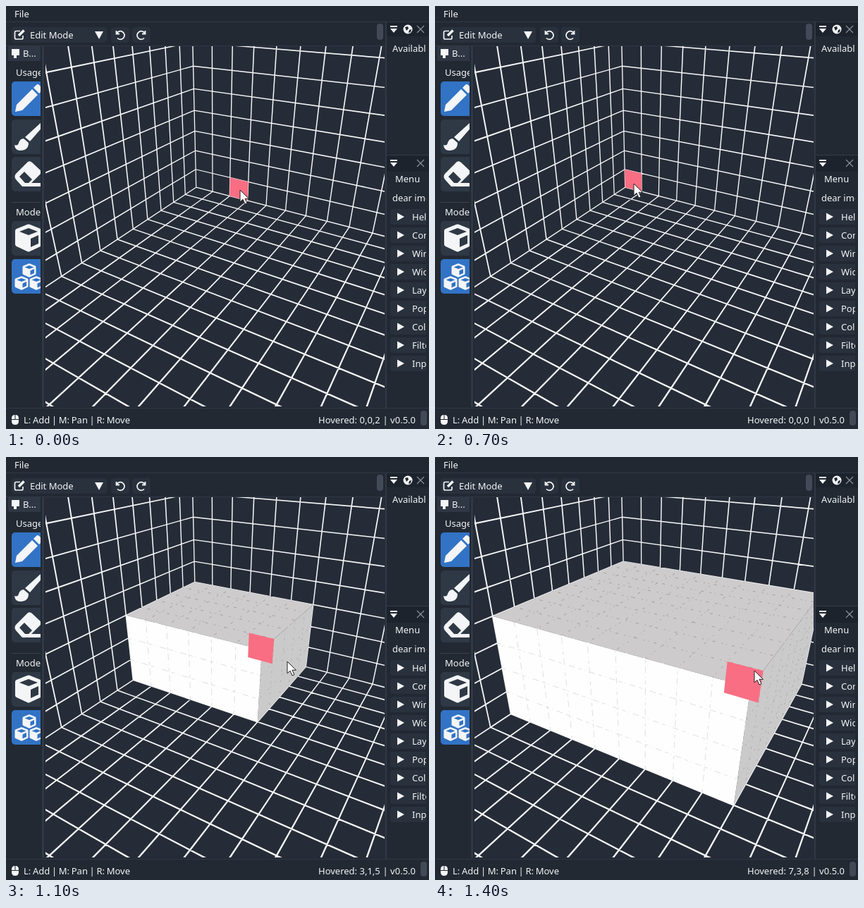
An HTML page for the animation above (1500 ms loop, 600 by 600 pixels).

```html
<!DOCTYPE html>
<html lang="en">
<head>
<meta charset="utf-8">
<title>Voxel editor</title>
<style>
html, body { margin: 0; width: 100%; height: 100%; overflow: hidden; background: #222933; }
svg { display: block; width: 100%; height: 100%; }
text { font: 500 13px "Noto Sans", "Open Sans", sans-serif; fill: #f3f5f7; white-space: pre; }
</style>
</head>
<body>
<svg viewBox="0 0 600 600">
  <defs>
    <clipPath id="view"><rect x="56" y="57" width="481" height="511"/></clipPath>
    <clipPath id="left"><rect y="56" width="49" height="514"/></clipPath>
    <clipPath id="right"><rect x="540" y="22" width="56" height="548"/></clipPath>
    <g id="fold" fill="#f3f5f7"><path d="M-5-5H5V-3H-5ZM-5-1H5L0 5Z"/></g>
    <path id="close" d="M-5-5L5 5M5-5L-5 5" stroke="#8d949e" stroke-width="1.1"/>
    <path id="cube" fill="#f3f5f7" fill-rule="evenodd" d="M-2-19Q0-20 2-19L17-13Q19-12 19-10V9Q19 11 17 12L2 19Q0 20-2 19L-17 12Q-19 11-19 9V-10Q-19-12-17-13ZM0-14L-13-9 0-4 13-9ZM3 1V13L14 8V-4Z"/>
    <path id="turn" d="M-5.5-6V-1.5H-1M-5-2A5.8 5.8 0 1 1-4 4.5" fill="none" stroke="#f3f5f7" stroke-width="1.8"/>
  </defs>

  <!-- bars -->
  <rect width="600" height="600" fill="#222933"/>
  <rect width="600" height="22" fill="#222832"/>
  <path d="M0 22.5H600M0 570.5H600M0 56.5H538" stroke="#303844"/>
  <text x="12" y="16">File</text>
  <rect x="8" y="30" width="135" height="22" rx="4" fill="#29313c"/>
  <g fill="none" stroke="#f3f5f7" stroke-width="1.7">
    <path d="M20 35.5H14.5Q12.500 35.500 12.500 37.500V45Q12.500 47 14.500 47H22Q24 47 24 45V42"/>
    <path d="M18 42L25.500 34.500" stroke-width="3.600"/>
  </g>
  <text x="34" y="46">Edit Mode</text>
  <path d="M126 36H138L132 47Z" fill="#f3f5f7"/>
  <rect x="149" y="30" width="26" height="22" rx="4" fill="#29313c"/>
  <rect x="179" y="30" width="26" height="22" rx="4" fill="#29313c"/>
  <use href="#turn" x="162" y="41"/>
  <use href="#turn" transform="translate(192 41) scale(-1 1)"/>
  <rect x="526" y="25" width="9" height="23" rx="4" fill="#424a57"/>

  <!-- tools -->
  <rect x="3" y="57" width="46" height="21" fill="#2e3743"/>
  <path d="M8 61H19V70H8ZM11 70H15V74H11Z" fill="#f3f5f7"/>
  <text x="24" y="72">B...</text>
  <g clip-path="url(#left)">
    <text x="14" y="99">Usage</text>
    <text x="14" y="297">Model</text>
    <path d="M8 278.500H49" stroke="#3a424e"/>
    <g id="buttons"></g>
    <path d="M13 150L15 140 37 118 45 126 23 148ZM39 116L43 112Q45 110 47 112L51 116Q53 118 51 120L47 124Z" fill="#f3f5f7"/>
    <path d="M49 166L53 170 34 192 27 186ZM25 188L32 194Q32 205 20 205 13 205 12 197 17 199 18 194 20 188 25 188Z" fill="#f3f5f7"/>
    <path d="M14 238L31 221Q34 219 37 222L51 235V236L36 251H52V256H23L14 246Q11 242 14 238ZM19 242L27 251H32L37 246 26 235Z" fill="#f3f5f7" fill-rule="evenodd"/>
    <use href="#cube" x="32" y="329"/>
    <use href="#cube" transform="translate(33 375) scale(.5)"/>
    <use href="#cube" transform="translate(22 393) scale(.5)"/>
    <use href="#cube" transform="translate(43 393) scale(.5)"/>
  </g>
  <path d="M52.500 57V569" stroke="#303946" stroke-width="3"/>

  <!-- viewport -->
  <rect x="55" y="57" width="483" height="512" fill="#262c37"/>
  <g clip-path="url(#view)">
    <path id="grid" fill="#f6f7f8"/>
    <g id="scene"></g>
    <path id="hover" fill="#f96e82"/>
  </g>

  <!-- side panels -->
  <path d="M539 22V570" stroke="#303844" stroke-width="2"/>
  <rect x="540" y="23" width="60" height="20" fill="#1d232d"/>
  <rect x="540" y="212" width="60" height="23" fill="#1d232d"/>
  <path d="M540 211.500H600" stroke="#343c48"/>
  <use href="#fold" x="550" y="33"/>
  <use href="#fold" x="550" y="223"/>
  <circle cx="570" cy="33" r="6.500" fill="#f3f5f7"/>
  <path d="M566 30L570 29 571 32 568 35ZM572 34L575 33 574 37 571 38Z" fill="#1d232d"/>
  <use href="#close" x="588" y="33"/>
  <use href="#close" x="588" y="223"/>
  <g clip-path="url(#right)">
    <text x="548" y="65">Available</text>
    <text x="552" y="250">Menu</text>
    <text x="548" y="277">dear imgui</text>
    <g id="tree"></g>
  </g>

  <!-- status -->
  <path d="M8 586V585Q8 580 12.500 580V586ZM13.500 580Q18 580 18 585V586H13.500ZM8 587H18V589Q18 594 13 594 8 594 8 589Z" fill="#f3f5f7"/>
  <text x="25" y="592" word-spacing="-.7">L: Add | M: Pan | R: Move</text>
  <text id="status" x="443" y="592"></text>
  <text x="581" y="592" text-anchor="end">| v0.5.0</text>
  <rect x="588" y="574" width="9" height="21" rx="4" fill="#424a57"/>

  <path id="cursor" d="M0 0V17L4 13.300 7 20 10 18.700 7 12.300H12.500Z" fill="#fff" stroke="#222" stroke-width="1"/>
</svg>
<script>
const el = id => document.getElementById(id);

// Camera: 45 degree lens centred in the viewport, no roll
const rad = Math.PI / 180;
const center = [296.7, 312.5];
const focal = 255.5 / Math.tan(22.5 * rad);
const pitch = 30 * rad, yaw = 31 * rad;
const dist = 22.6;
const origin = [269.7, 257.2]; // where the grid corner lands on screen
const [sp, cp, sy, cy] = [Math.sin(pitch), Math.cos(pitch), Math.sin(yaw), Math.cos(yaw)];

function project([x, y, z]) {
  const along = x * cy + z * sy;
  const depth = dist - cp * along - sp * y;
  const right = z * cy - x * sy + (origin[0] - center[0]) / focal * dist;
  const down = sp * along - cp * y + (origin[1] - center[1]) / focal * dist;
  return [center[0] + focal * right / depth, center[1] + focal * down / depth, depth / dist];
}
const pt = p => project(p).slice(0, 2).map(n => n.toFixed(2)).join(" ");
const poly = ps => "M" + ps.map(pt).join("L") + "Z";

// A line that gets thicker toward the viewer
function beam(a, b) {
  const [ax, ay, aw] = project(a), [bx, by, bw] = project(b);
  const len = Math.hypot(bx - ax, by - ay);
  const nx = (ay - by) / len, ny = (bx - ax) / len;
  const h = 0.6;
  const at = (x, y, r) => (x + nx * r).toFixed(2) + " " + (y + ny * r).toFixed(2);
  return "M" + [at(ax, ay, h / aw), at(bx, by, h / bw), at(bx, by, -h / bw), at(ax, ay, -h / aw)].join("L") + "Z";
}

function drawGrid() {
  const N = 14, H = 8;
  let d = "";
  for (let i = 0; i <= N; i++) {
    d += beam([i, 0, 0], [i, 0, N]) + beam([0, 0, i], [N, 0, i]);
    d += beam([i, 0, 0], [i, H, 0]) + beam([0, 0, i], [0, H, i]);
    if (i && i <= H) d += beam([0, i, 0], [N, i, 0]) + beam([0, i, 0], [0, i, N]);
  }
  el("grid").setAttribute("d", d);
}

// Quad in the plane normal to an axis, from corner lo to corner hi
function quad(axis, lo, hi) {
  const [a, b] = [0, 1, 2].filter(i => i !== axis);
  return [[lo, lo], [hi, lo], [hi, hi], [lo, hi]].map(([p, q]) => {
    const r = [...lo];
    r[a] = p[a];
    r[b] = q[b];
    return r;
  });
}

function seams(axis, lo, hi) {
  const [a, b] = [0, 1, 2].filter(i => i !== axis);
  let d = "";
  for (const [m, n] of [[a, b], [b, a]]) {
    for (let i = lo[m] + 1; i < hi[m]; i++) {
      const p = [...lo], q = [...lo];
      p[m] = q[m] = i;
      q[n] = hi[n];
      d += "M" + pt(p) + "L" + pt(q);
    }
  }
  return d;
}

function box(lo, hi) {
  const fills = ["#fefefe", "#cdcbcc", "#cbcaca"];
  const dashes = ["5 4 1 6 9 5", "1 7 4 9 2 5", "1 5 3 6"];
  const tones = ["#d2d2d4", "#8b8b8e", "#a2a2a5"];
  return [1, 2, 0].map(axis => {
    const from = [...lo];
    from[axis] = hi[axis];
    return `<path d="${poly(quad(axis, from, hi))}" fill="${fills[axis]}"/>` +
      `<path d="${seams(axis, from, hi)}" fill="none" stroke="${tones[axis]}" stroke-width=".7" stroke-dasharray="${dashes[axis]}"/>`;
  }).join("");
}

const solid = (x, y, z) => [[[0, 0, 0], [x, y, z]]];

// Each step: pointer, hovered cell, face axis, boxes, status
const steps = [
  { at: [332, 261], cell: [0, 0, 2] },
  { at: [312, 259], cell: [0, 0, 1] },
  { at: [294, 257], cell: [0, 0, 1] },
  { at: [284, 253], cell: [0, 0, 0] },
  { at: [280, 251], cell: [0, 0, 0] },
  { at: [279, 251], cell: [0, 0, 0] },
  { at: [279, 251], cell: [0, 0, 0] },
  { at: [282, 252], cell: [0, 0, 0] },
  { at: [297, 258], cell: [0, 0, 1], boxes: solid(1, 1, 2), label: "0,0,0" },
  { at: [316, 266], cell: [1, 1, 1], axis: 1, boxes: solid(2, 2, 2), label: "0,0,1" },
  { at: [360, 280], cell: [3, 1, 5], boxes: solid(4, 2, 6), label: "1,1,1" },
  { at: [399, 290], cell: [4, 2, 5], boxes: solid(5, 3, 6), label: "3,1,5" },
  { at: [430, 298], cell: [5, 3, 7], boxes: solid(6, 4, 8) },
  { at: [453, 303], cell: [4, 2, 8], axis: 2, boxes: [...solid(6, 4, 8), [[0, 0, 8], [5, 3, 9]]] },
  { at: [453, 303], cell: [7, 3, 8], boxes: solid(8, 4, 9) }
];

let shown = -1;
function render(ms) {
  const i = Math.floor(ms % 1500 / 100);
  if (i === shown) return;
  shown = i;
  const { at, cell, axis = 0, boxes = [], label = cell.join() } = steps[i];
  el("scene").innerHTML = boxes.map(b => box(...b)).join("");
  el("hover").setAttribute("d", poly(quad(axis, cell, cell.map(n => n + 1))));
  el("cursor").setAttribute("transform", `translate(${at})`);
  el("status").textContent = "Hovered: " + label;
}

el("buttons").innerHTML = [107, 161, 214, 305, 359].map((y, i) =>
  `<rect x="8" y="${y}" width="50" height="49" rx="5" fill="${i % 4 ? "#2f3845" : "#3273c5"}"/>`).join("");
el("tree").innerHTML = ["Help", "Configuration", "Window options", "Widgets", "Layout", "Popups", "Columns", "Filtering", "Inputs"]
  .map((s, i) => {
    const y = 299 + 26 * i;
    return `<rect x="545" y="${y - 11}" width="60" height="22" rx="4" fill="#29313c"/>` +
      `<path d="M555 ${y - 5.5}L565 ${y}L555 ${y + 5.5}Z" fill="#f3f5f7"/><text x="576" y="${y + 5}">${s}</text>`;
  }).join("");

drawGrid();
const start = performance.now();
function tick() {
  render(performance.now() - start);
  requestAnimationFrame(tick);
}
render(0);
requestAnimationFrame(tick);
</script>
</body>
</html>
```
